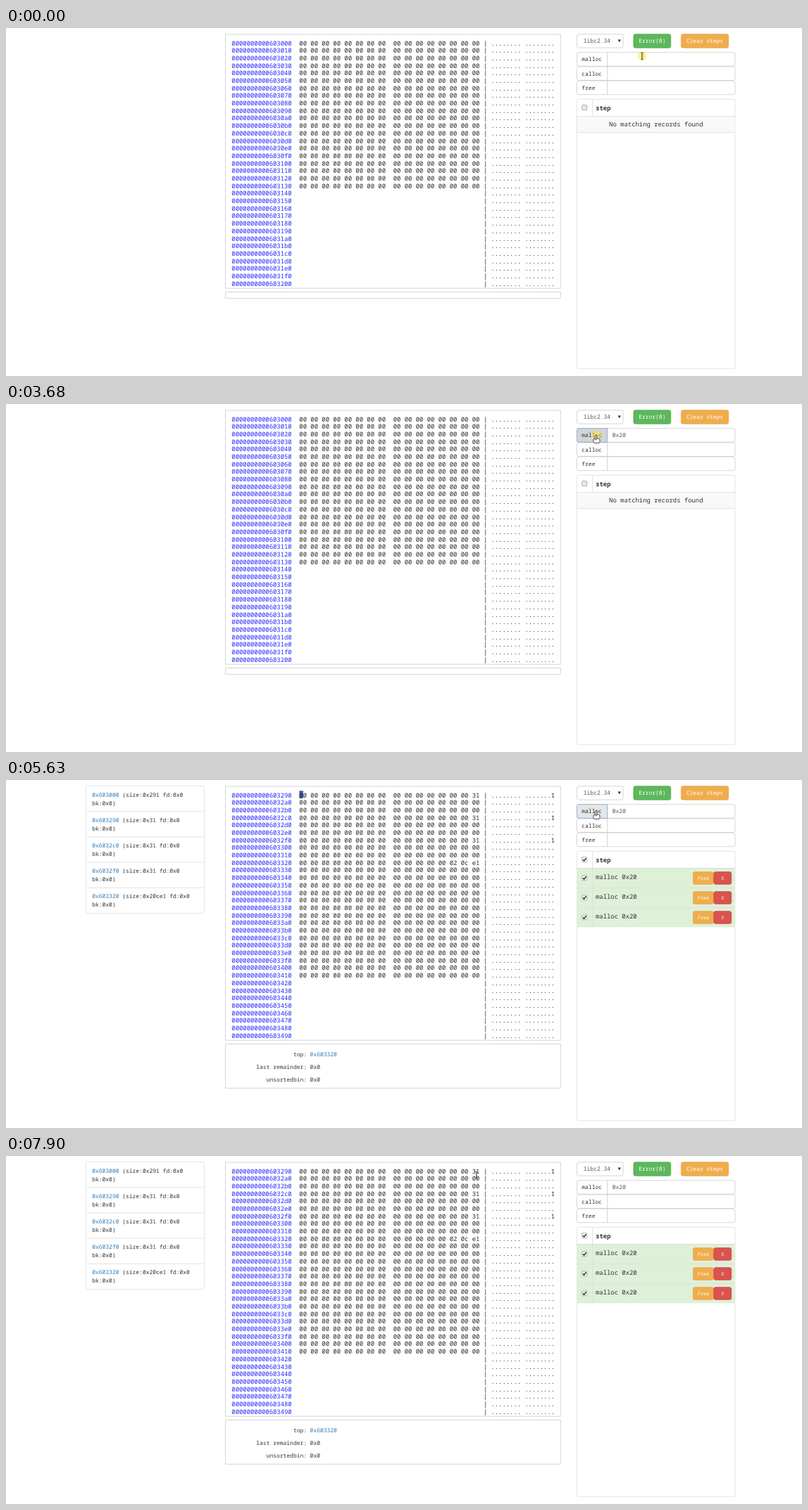
An HTML page with a canvas for the animation above (8 s loop, 1130 by 495 pixels).

```html
<!DOCTYPE html>
<html lang="en">
<head>
<meta charset="utf-8">
<title>Heap viewer</title>
<style>
html, body { margin: 0; width: 100%; height: 100%; overflow: hidden; background: #fff; }
canvas { display: block; }
</style>
</head>
<body>
<canvas id="stage" width="1130" height="495"></canvas>
<script>
const ctx = document.getElementById('stage').getContext('2d');
const LOOP = 8000, TICK = 70;
const BIG = 8.903, MID = 7.97, SMALL = 6.7;
const ROW = 10.69, STEP_ROW = 28, CHUNK_ROW = 36.2;
const HEAP = 0x603000, FIRST = 0x603290, HEAP_END = 0x624001, CHUNK = 0x30;
const LINK = '#337ab7', DARK = '#333', GRAY = '#ccc', LIGHT = '#ddd';

// What the user does; everything else follows from these times
const INPUT_CLICK = 70, ROW_CLICK = 6600, HEX_CLICK = 7560;
const MALLOC_CLICKS = [3610, 4290, 5360];
const CLICKS = [INPUT_CLICK, ...MALLOC_CLICKS, ROW_CLICK, HEX_CLICK];
const KEYS = [810, 1610, 1940, 2010];
const SERVER_READY = 4430;
const MOVES = [
  { from: 3260, to: 3540, x: 838, y: 44 },
  { from: 5640, to: 6120, x: 893, y: 130 },
  { from: 6190, to: 6400, x: 894, y: 141 },
  { from: 6650, to: 7000, x: 789, y: 95 },
  { from: 7000, to: 7490, x: 668, y: 20 },
  { from: 7760, to: 7900, x: 668, y: 27 }
];

const passed = (t, times) => times.filter(time => time <= t).length;
const blink = (elapsed, half) => Math.floor(elapsed / half) % 2 === 0;
const hex = n => n.toString(16);

function mouseAt(t) {
  const mouse = { x: 903, y: 40 };
  for (const { from, to, x, y } of MOVES) {
    if (t < from) break;
    const part = t >= to ? 1 : Math.floor((t - from) / TICK) * TICK / (to - from);
    mouse.x += (x - mouse.x) * part;
    mouse.y += (y - mouse.y) * part;
  }
  return mouse;
}

function stateAt(t) {
  const added = MALLOC_CLICKS.map(click => click + 2 * TICK);
  const answered = added.map(time => Math.max(time + TICK, SERVER_READY));
  const typed = passed(t, KEYS);
  const inputFocus = t >= INPUT_CLICK && t < MALLOC_CLICKS[0];
  const lastKey = typed ? KEYS[typed - 1] : INPUT_CLICK;
  return {
    typed,
    inputFocus,
    glow: Math.min(1, (t - INPUT_CLICK) / 150),
    caret: inputFocus && blink(t - lastKey, 530),
    buttonFocus: t >= MALLOC_CLICKS[0] && t < HEX_CLICK,
    pressed: MALLOC_CLICKS.some(c => t >= c && t < c + 2 * TICK),
    clickMark: CLICKS.some(c => t >= c - TICK && t < c + 3 * TICK),
    hexCursor: t >= 400 && t < ROW_CLICK && (t >= SERVER_READY || blink(t - 400, 600)),
    selected: t >= ROW_CLICK && t < HEX_CLICK,
    steps: passed(t, added),
    chunks: heapChunks(passed(t, answered)),
    mouse: mouseAt(t)
  };
}

function heapChunks(count) {
  if (!count) return [];
  const top = FIRST + count * CHUNK;
  const used = Array.from({ length: count }, (_, i) => ({ at: FIRST + i * CHUNK, size: CHUNK + 1 }));
  return [{ at: HEAP, size: FIRST - HEAP + 1 }, ...used, { at: top, size: HEAP_END - top }];
}

// y is the middle of the digits
function text(string, x, y, size = MID, color = DARK, align = 'left', weight = 400) {
  ctx.font = `${weight} ${size}px "Noto Sans Mono", monospace`;
  ctx.textRendering = 'geometricPrecision';
  ctx.textAlign = align;
  ctx.fillStyle = color;
  ctx.fillText(string, x, y + size * 0.357);
}

function box(x, y, right, bottom, fill, stroke, radius = 0) {
  ctx.beginPath();
  ctx.roundRect(x, y, right - x, bottom - y, radius);
  if (fill) { ctx.fillStyle = fill; ctx.fill(); }
  if (stroke) { ctx.strokeStyle = stroke; ctx.lineWidth = 0.8; ctx.stroke(); }
}

function line(x1, y1, x2, y2, color = LIGHT, width = 0.8) {
  ctx.beginPath();
  ctx.moveTo(x1, y1);
  ctx.lineTo(x2, y2);
  ctx.strokeStyle = color;
  ctx.lineWidth = width;
  ctx.stroke();
}

function shape(path, fill, stroke, width = 0.8) {
  const p = new Path2D(path);
  if (fill) { ctx.fillStyle = fill; ctx.fill(p); }
  if (stroke) { ctx.strokeStyle = stroke; ctx.lineWidth = width; ctx.stroke(p); }
}

function button(label, x, y, right, bottom, fill, stroke, size = MID) {
  box(x, y, right, bottom, fill, stroke, 2.5);
  text(label, (x + right) / 2, (y + bottom) / 2, size, '#fff', 'center');
}

function checkbox(x, y, checked) {
  box(x - 3.5, y - 3.5, x + 3.5, y + 3.5, checked ? '#fff' : '#e8e8e8', '#999', 1.2);
  if (checked) shape(`M${x - 2.2} ${y} l1.6 1.8 l3 -3.8`, null, '#222', 1.4);
}

function drawChunks(chunks) {
  if (!chunks.length) return;
  box(113.5, 8.5, 281.5, 8.5 + CHUNK_ROW * chunks.length, '#fff', LIGHT, 2.5);
  chunks.forEach(({ at, size }, i) => {
    const y = 8.5 + CHUNK_ROW * i;
    if (i) line(113.5, y, 281.5, y);
    text('0x' + hex(at), 122.2, y + 12.2, MID, LINK);
    text(' '.repeat(9) + `(size:0x${hex(size)} fd:0x0`, 122.2, y + 12.2);
    text('bk:0x0)', 122.2, y + 24.2);
  });
}

function drawMemory({ chunks, hexCursor, selected }) {
  box(311.5, 9, 787.3, 370.2, '#fff', GRAY);
  if (selected) box(416.5, 15.5, 673.5, 37, '#dcdcf8');
  if (hexCursor) box(416.4, 15.3, 421.9, 26, '#3a5fa5');
  const base = chunks.length ? FIRST : HEAP;
  const end = chunks.length ? chunks.at(-1).at + 0x100 : HEAP + 0x140;
  for (let i = 0; i < 33; i++) {
    const address = base + i * 16, y = 21.4 + i * ROW;
    const chunk = chunks.find(c => c.at === address);
    const bytes = hex(chunk ? chunk.size : 0).padStart(32, '0').match(/../g);
    const halves = [bytes.slice(0, 8), bytes.slice(8)];
    const shown = address < end ? halves.map(half => half.join(' ')).join('  ') : '';
    const ascii = halves.map(half => half.map(b => b === '31' ? '1' : '.').join('')).join(' ');
    text(hex(address).padStart(16, '0'), 320.3, y, BIG, '#2828ff');
    text(' '.repeat(18) + shown.padEnd(48) + ' | ' + ascii, 320.3, y, BIG, '#2a2a2a');
  }
}

function drawSummary(chunks) {
  box(311.5, 375.5, 787.3, chunks.length ? 438.3 : 384.5, '#fff', GRAY);
  if (!chunks.length) return;
  ['top:', 'last remainder:', 'unsortedbin:'].forEach((label, i) => {
    const y = 390.4 + i * 17.85;
    text(label, 427, y, MID, DARK, 'right');
    text(i ? '0x0' : '0x' + hex(chunks.at(-1).at), 431.6, y, MID, i ? DARK : LINK);
  });
}

function drawControls({ typed, inputFocus, glow, caret, buttonFocus, pressed, mouse }) {
  box(810.5, 8.8, 876, 28.2, '#fff', GRAY, 2.5);
  text('libc2.34', 819.8, 18.5, MID, '#555');
  shape('M868.6 16.6 h4.2 l-2.1 3.8 z', DARK);
  button('Error(0)', 890.9, 8.8, 943.7, 28.2, '#5cb85c', '#4cae4c');
  button('Clear steps', 958.4, 8.8, 1025.7, 28.2, '#f0ad4e', '#eea236');

  ['malloc', 'calloc', 'free'].forEach((name, i) => {
    const y = 34.7 + i * 20.2;
    box(810.5, y, 1035, y + 19.6, '#fff', GRAY, 2.5);
    line(853.5, y, 853.5, y + 19.6, GRAY);
    text(name, 817.3, y + 9.8);
  });

  if (inputFocus) {
    ctx.save();
    ctx.globalAlpha = glow;
    ctx.shadowColor = 'rgba(102,175,233,.6)';
    ctx.shadowBlur = 5;
    box(853.5, 34.7, 1035, 54.3, '#fff', '#66afe9', [0, 2.5, 2.5, 0]);
    ctx.restore();
  }
  const hovered = mouse.x > 810 && mouse.x < 854 && mouse.y > 34 && mouse.y < 55;
  if (hovered || buttonFocus) {
    box(810.5, 34.7, 853.5, 54.3, pressed ? '#d4d4d4' : '#e6e6e6', buttonFocus ? '#7ba6dc' : '#adadad', [2.5, 0, 0, 2.5]);
    text('malloc', 817.3, 44.5);
  }
  text('0x20'.slice(0, typed), 860.8, 44.5, MID, '#555');
  const caretX = Math.floor(861 + typed * 4.78) + 0.5;
  if (caret) line(caretX, 40, caretX, 50, '#444');
}

function drawSteps({ steps, mouse }) {
  box(810.5, 101.2, 1035, 484.7, '#fff', LIGHT, 2.5);
  line(832.5, 101.5, 832.5, 125.5);
  checkbox(821.2, 113.2, steps > 0);
  text('step', 837.2, 113.5, BIG, DARK, 'left', 700);
  if (!steps) {
    box(811, 125.5, 1034.5, 148.5, '#f9f9f9');
    line(811, 148.5, 1034.5, 148.5);
    text('No matching records found', 922.8, 137.3, BIG, DARK, 'center');
  }
  for (let i = 0; i < steps; i++) {
    const y = 125.5 + i * STEP_ROW;
    const hovered = mouse.x > 810 && mouse.x < 1035 && mouse.y > y && mouse.y < y + STEP_ROW;
    box(811, y, 1034.5, y + STEP_ROW, hovered ? '#d0e9c6' : '#dff0d8');
    line(811, y, 1034.5, y, '#d8e2d3');
    line(832.5, y, 832.5, y + STEP_ROW, '#d8e2d3');
    checkbox(821.2, y + 13.8, true);
    text('malloc 0x20', 837, y + 12, BIG);
    button('Free', 975.4, y + 5.2, 1004.4, y + 22.8, '#f0ad4e', '#eea236', SMALL);
    button('X', 1004.9, y + 5.2, 1029.7, y + 22.8, '#d9534f', '#d43f3a', SMALL);
  }
  line(811, 125.5, 1034.5, 125.5);
}

const pointers = {
  text() {
    line(0, -4.5, 0, 4.5, '#222', 1);
    for (const y of [-4.7, 4.7]) line(-2, y, 2, y, '#444');
  },
  hand() {
    box(-4, 5, 5, 11.5, '#fff', '#222', 2);
    box(-1.6, 0, 0.6, 7, '#fff', '#222', 1);
  },
  move() {
    for (let i = 0; i < 4; i++) {
      shape('M-1 -1 V-4 H-2.6 L0 -6.8 L2.6 -4 H1 V-1', '#fff', '#666', 0.7);
      ctx.rotate(Math.PI / 2);
    }
  },
  arrow() {
    shape('M0 0 V9 L2 7.2 L3.4 10.6 L4.9 10 L3.5 6.7 H6.1 Z', '#fff', '#222');
  }
};

function pointerKind({ x, y }) {
  if (x < 787) return 'text';
  if (y < 55 && x > 810) return x < 854 ? 'hand' : 'text';
  return x > 810 && y > 125 ? 'move' : 'arrow';
}

function drawMouse({ mouse, clickMark }) {
  ctx.save();
  ctx.translate(mouse.x, mouse.y);
  if (clickMark) {
    const mark = ctx.createRadialGradient(0, 0, 3, 0, 0, 7);
    mark.addColorStop(0, 'rgba(255,232,60,.65)');
    mark.addColorStop(1, 'rgba(255,232,60,.25)');
    ctx.beginPath();
    ctx.arc(0, 0, 6.8, 0, Math.PI * 2);
    ctx.fillStyle = mark;
    ctx.fill();
  }
  pointers[pointerKind(mouse)]();
  ctx.restore();
}

function draw() {
  const state = stateAt((performance.now() - start) % LOOP);
  ctx.fillStyle = '#fff';
  ctx.fillRect(0, 0, 1130, 495);
  drawChunks(state.chunks);
  drawMemory(state);
  drawSummary(state.chunks);
  drawControls(state);
  drawSteps(state);
  drawMouse(state);
  requestAnimationFrame(draw);
}

const start = performance.now();
draw();
</script>
</body>
</html>
```
